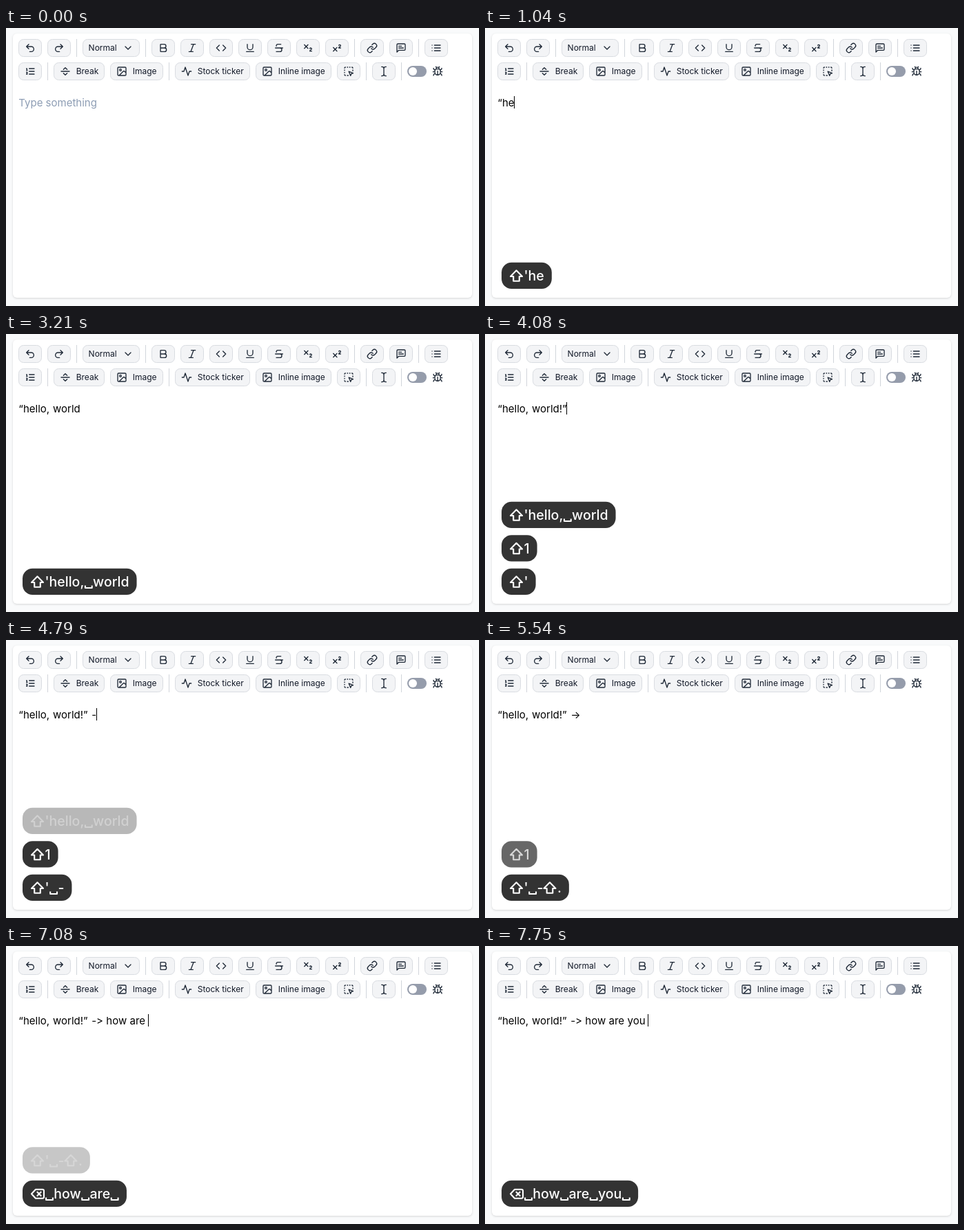
Animation, 686 px wide and 404 px high, one loop 8 s. Source, as an HTML page:

```html
<!DOCTYPE html>
<html lang="en">
<head>
<meta charset="utf-8">
<title>Editor typing</title>
<style>
  html, body { margin: 0; width: 100%; height: 100%; overflow: hidden; background: #f9fafb; }
  svg { display: block; }
  text { font-family: Inter, "Liberation Sans", sans-serif; font-feature-settings: "calt" 0; font-variant-ligatures: none; white-space: pre; }
  .card { fill: #fff; filter: drop-shadow(0 1px 1.5px rgba(0, 0, 0, .14)); }
  .btn { fill: #f3f4f6; stroke: #d9dce1; }
  .sep { fill: #d1d5db; }
  .label { font-size: 12px; fill: #111827; }
  .icon { fill: none; stroke: #1f2937; stroke-width: 2; stroke-linecap: round; stroke-linejoin: round; }
  .doc { font-size: 15px; fill: #000; }
  .hint { font-size: 15px; fill: #8d9db4; }
  .keys text { font-size: 19.5px; font-weight: 500; fill: #fff; }
  .keys path { fill: none; stroke: #fff; stroke-width: 2.1; stroke-linejoin: round; }
</style>
</head>
<body>
<svg id="stage" width="686" height="404" viewBox="0 0 686 404">
  <rect class="card" x="10" y="8" width="666" height="384" rx="6"/>
  <g id="bar"></g>
  <text id="hint" class="hint" x="18.3" y="113.5">Type something</text>
  <g id="doc"></g>
  <rect id="caret" y="99" width="1" height="18"/>
  <g id="pills"></g>
</svg>
<script>
const NS = "http://www.w3.org/2000/svg";
const $ = id => document.getElementById(id);

function add(parent, tag, attrs, text) {
  const el = document.createElementNS(NS, tag);
  for (const k in attrs) el.setAttribute(k, attrs[k]);
  if (text) el.textContent = text;
  parent.appendChild(el);
  return el;
}

// ---- toolbar ----
const ICONS = {
  undo: "M9 14 4 9l5-5M4 9h10.5a5.5 5.5 0 0 1 0 11H11",
  redo: "M15 14l5-5-5-5M20 9H9.5a5.5 5.5 0 0 0 0 11H13",
  chevron: "M6 9l6 6 6-6",
  bold: "M6 12h9a4 4 0 0 1 0 8H7a1 1 0 0 1-1-1V5a1 1 0 0 1 1-1h7a4 4 0 0 1 0 8",
  italic: "M19 4h-9M14 20H5M15 4 9 20",
  code: "M16 18l6-6-6-6M8 6l-6 6 6 6",
  underline: "M6 4v6a6 6 0 0 0 12 0V4M4 20h16",
  strike: "M16 4H9a3 3 0 0 0-2.83 4M14 12a4 4 0 0 1 0 8H6M4 12h16",
  sub: "M4 5l8 8M12 5l-8 8M20 19h-4c0-1.5.44-2 1.5-2.5S20 15.33 20 14a2.1 2.1 0 0 0-4-.7",
  sup: "M4 19l8-8M12 19l-8-8M20 12h-4c0-1.5.44-2 1.5-2.5S20 8.33 20 7a2.1 2.1 0 0 0-4-.7",
  link: "M10 13a5 5 0 0 0 7.54.54l3-3a5 5 0 0 0-7.07-7.07l-1.72 1.71M14 11a5 5 0 0 0-7.54-.54l-3 3a5 5 0 0 0 7.07 7.07l1.71-1.71",
  note: "M21 15a2 2 0 0 1-2 2H7l-4 4V5a2 2 0 0 1 2-2h14a2 2 0 0 1 2 2zM13 8H7M17 12H7",
  list: "M8 6h13M8 12h13M8 18h13M3 6h.01M3 12h.01M3 18h.01",
  ordered: "M10 6h11M10 12h11M10 18h11M4 6h1v4M4 10h2M6 18H4c0-1 2-2 2-3s-1-1.5-2-1",
  rule: "M3 12h18M8 8l4-4 4 4M16 16l-4 4-4-4",
  image: "M5 3h14a2 2 0 0 1 2 2v14a2 2 0 0 1-2 2H5a2 2 0 0 1-2-2V5a2 2 0 0 1 2-2M7 9a2 2 0 0 0 4 0 2 2 0 0 0-4 0M21 15l-3.1-3.1a2 2 0 0 0-2.8 0L6 21",
  pulse: "M22 12h-4l-3 9L9 3l-3 9H2",
  pick: "M12.3 12.3l9.4 3.7-4.1 1.4-1.4 4.2zM5 3a2 2 0 0 0-2 2M19 3a2 2 0 0 1 2 2M5 21a2 2 0 0 1-2-2M9 3h1M9 21h2M14 3h1M3 9v1M21 9v2M3 14v1",
  beam: "M17 22h-1a4 4 0 0 1-4-4V6a4 4 0 0 1 4-4h1M7 22h1a4 4 0 0 0 4-4M7 2h1a4 4 0 0 1 4 4",
  bug: "M8 2l1.88 1.88M14.12 3.88 16 2M9 7.13v-1a3 3 0 1 1 6 0v1M12 20c-3.3 0-6-2.7-6-6v-3a4 4 0 0 1 4-4h4a4 4 0 0 1 4 4v3c0 3.3-2.7 6-6 6M12 20v-9M6.53 9C4.6 8.8 3 7.1 3 5M6 13H2M3 21c0-2.1 1.7-3.9 3.8-4M20.97 5c0 2.1-1.6 3.8-3.5 4M22 13h-4M17.2 17c2.1.1 3.8 1.9 3.8 4"
};
const bar = $("bar");

function icon(name, cx, cy) {
  add(bar, "path", { class: "icon", d: ICONS[name], transform: `translate(${cx - 8} ${cy - 8}) scale(${2 / 3})` });
}
function button(x, cy, w, name, label) {
  add(bar, "rect", { class: "btn", x: x + .5, y: cy - 12.5, width: w - 1, height: 25, rx: 7 });
  icon(name, label ? x + 17 : x + w / 2, cy);
  if (label) add(bar, "text", { class: "label", x: x + 32.7, y: cy + 4.2 }, label);
}
function sep(x, cy) {
  add(bar, "rect", { class: "sep", x, y: cy - 13, width: 1, height: 26 });
}
function run(x, cy, names) {
  names.forEach((n, i) => button(x + i * 42, cy, 34, n));
}

const R1 = 29, R2 = 63;
run(18, R1, ["undo", "redo"]);
add(bar, "rect", { class: "btn", x: 111.5, y: 16.5, width: 82, height: 25, rx: 7 });
add(bar, "text", { class: "label", x: 119.6, y: 33.2 }, "Normal");
icon("chevron", 177, R1);
run(211, R1, ["bold", "italic", "code", "underline", "strike", "sub", "sup"]);
run(514, R1, ["link", "note"]);
run(607, R1, ["list"]);
[102, 202, 505, 598].forEach(x => sep(x, R1));

run(18, R2, ["ordered"]);
button(69, R2, 74, "rule", "Break");
button(151, R2, 77, "image", "Image");
button(245, R2, 109, "pulse", "Stock ticker");
button(362, R2, 110, "image", "Inline image");
run(480, R2, ["pick"]);
run(531, R2, ["beam"]);
[60, 236, 522, 573].forEach(x => sep(x, R2));
add(bar, "rect", { x: 582, y: 55, width: 28, height: 16, rx: 8, fill: "#959cab" });
add(bar, "circle", { cx: 590, cy: R2, r: 6, fill: "#fff" });
icon("bug", 626, R2);

// ---- typing script: time, key caps, typed text ----
const LOOP = 8000;
const STROKES = [
  [710, "⇧'", "“"], [920, "h"], [1040, "e"], [1250, "l"], [1420, "l"], [1580, "o"],
  [1790, ","], [2040, "␣", " "],
  [2250, "w"], [2380, "o"], [2460, "r"], [2580, "l"], [2710, "d"],
  [3540, "⇧1", "!"], [4080, "⇧'", "”"], [4380, "␣", " "], [4630, "-"], [4985, "⇧.", ">"],
  [5790, "⌫", ""], [6080, "␣", " "],
  [6330, "h"], [6420, "o"], [6540, "w"], [6630, "␣", " "],
  [6750, "a"], [6830, "r"], [6920, "e"], [7040, "␣", " "],
  [7330, "y"], [7540, "o"], [7630, "u"], [7750, "␣", " "]
];
const WORD_X = [18.3, 68, 124.2, 145.3, 179.5, 206.6, 236.5];
const PAUSE = 500, HOLD = 1950, FADE = 200;

// Typing "->" becomes an arrow; backspace undoes that.
function type(text, key, typed = key) {
  if (key === "⌫") return text.replace(/→$/, "->");
  return (text + typed).replace(/->$/, "→");
}

// Keys pressed close together share a pill.
function stateAt(count) {
  let text = "", last = -Infinity;
  const pills = [];
  for (const [at, key, typed] of STROKES.slice(0, count)) {
    text = type(text, key, typed);
    if (at - last > PAUSE) pills.push({ keys: "" });
    const pill = pills[pills.length - 1];
    pill.keys += key;
    pill.last = last = at;
  }
  return { text, pills };
}

// ---- key pills ----
const CAPS = {
  "⇧": { w: 20.5, d: "M9.5 11.5 18 20.2H13.8V27H5.2V20.2H1Z" },
  "⌫": { w: 20.5, d: "M1 19.5 7 13H17a2 2 0 0 1 2 2V24a2 2 0 0 1-2 2H7ZM8.8 16.3l6.4 6.4M15.2 16.3l-6.4 6.4" },
  "␣": { w: 12.8, d: "M1.6 24.6V28.2H11.4V24.6" }
};

function drawPill(keys, row) {
  const g = add($("pills"), "g", { transform: `translate(24 ${(340.8 - row * 48.5).toFixed(1)})` });
  const box = add(g, "rect", { height: 38.2, rx: 14.5, fill: "#333" });
  const face = add(g, "g", { class: "keys" });
  let x = 12;
  for (const part of keys.split(/([⇧⌫␣])/).filter(Boolean)) {
    const cap = CAPS[part];
    if (cap) {
      add(face, "path", { d: cap.d, transform: `translate(${x} 0)` });
      x += cap.w;
    } else {
      x += add(face, "text", { x, y: 26.4 }, part).getComputedTextLength();
    }
  }
  box.setAttribute("width", x + 11);
  return [box, face];
}

// ---- rendering ----
let shown = -1, state, layers, caretX;

function rebuild(count) {
  shown = count;
  state = stateAt(count);
  $("hint").style.display = state.text ? "none" : "";
  $("doc").textContent = "";
  state.text.split(" ").forEach((word, i) => {
    const el = add($("doc"), "text", { class: "doc", x: WORD_X[i], y: 113.5 }, word);
    caretX = WORD_X[i] + (word ? el.getComputedTextLength() : 0);
  });
  $("caret").setAttribute("x", Math.floor(caretX));
  $("pills").textContent = "";
  layers = state.pills.map((p, i) => drawPill(p.keys, state.pills.length - 1 - i));
}

function render(t) {
  const count = STROKES.filter(s => s[0] <= t).length;
  if (count !== shown) rebuild(count);
  const since = t - (count ? STROKES[count - 1][0] : 80);
  $("caret").style.display = since >= 0 && since % 1000 < 500 ? "" : "none";
  state.pills.forEach((p, i) => {
    const alpha = Math.max(0, Math.min(1, 1 - (t - p.last - HOLD) / FADE));
    layers[i].forEach(el => el.setAttribute("opacity", alpha));
  });
}

const start = performance.now();
function tick() {
  render((performance.now() - start) % LOOP);
  requestAnimationFrame(tick);
}
tick();
</script>
</body>
</html>
```
